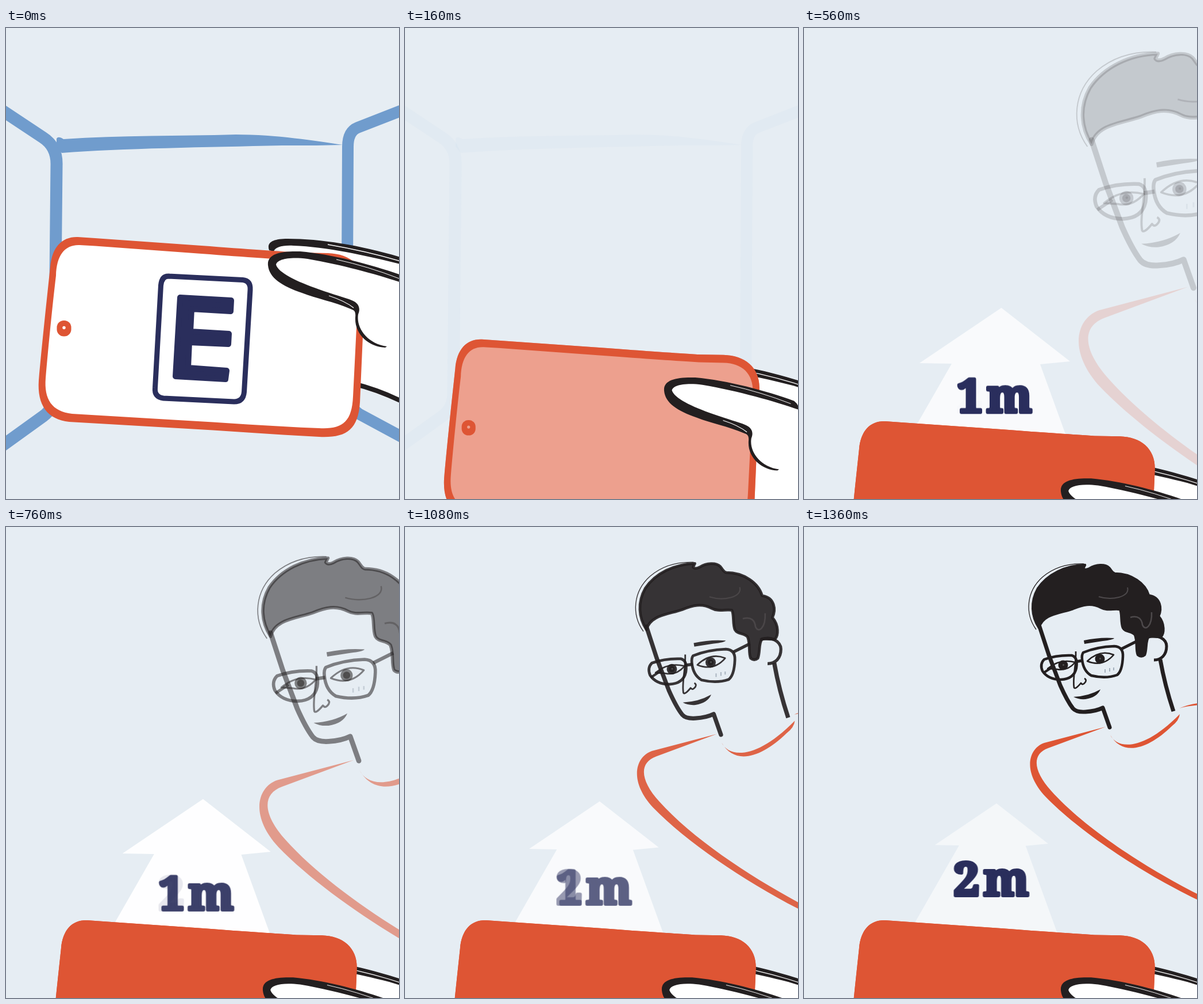
Write an HTML page with a canvas that moves like this. It is 684 px wide and 818 px high and loops after 1.4 s.

```html
<!DOCTYPE html>
<html lang="en">
<head>
<meta charset="utf-8">
<title>Arm's length</title>
<style>
html, body { margin: 0; width: 684px; height: 818px; overflow: hidden; background: #e6edf3; }
canvas { display: block; }
</style>
</head>
<body>
<canvas id="stage" width="684" height="818"></canvas>
<script>
const ctx = document.getElementById('stage').getContext('2d');
const LOOP = 1400, STEP = 40;
const SKY = '#e6edf3', BLUE = '#709ccd', ORANGE = '#de5534', NAVY = '#2a2e5c', INK = '#231f20', WHITE = '#fff';

const progress = (t, start, length) => Math.min(1, Math.max(0, (t - start) / length));
const easeOut = x => 1 - (1 - x) ** 2;
const mix = (a, b, x) => a + (b - a) * x;

const cache = new Map();
function path(d) {
  if (!cache.has(d)) cache.set(d, new Path2D(d));
  return cache.get(d);
}
function fill(d, color) {
  ctx.fillStyle = color;
  ctx.fill(path(d));
}
function line(d, color, width, cap = 'butt') {
  ctx.strokeStyle = color;
  ctx.lineWidth = width;
  ctx.lineCap = cap;
  ctx.lineJoin = 'round';
  ctx.stroke(path(d));
}
function dot(x, y, r, color) {
  ctx.fillStyle = color;
  ctx.beginPath();
  ctx.arc(x, y, r, 0, Math.PI * 2);
  ctx.fill();
}
function layer(alpha, draw) {
  if (alpha <= 0) return;
  ctx.save();
  ctx.globalAlpha = alpha;
  draw();
  ctx.restore();
}
function place(x, y, scale, draw) {
  ctx.save();
  ctx.translate(x, y);
  ctx.scale(scale, scale);
  draw();
  ctx.restore();
}

// Labels are rendered once so they can cross-fade as a single layer.
function makeLabel(text) {
  const c = document.createElement('canvas');
  c.width = 220;
  c.height = 110;
  const g = c.getContext('2d');
  g.font = '900 80px "Noto Serif", serif';
  g.letterSpacing = '7px';
  g.textAlign = 'center';
  g.lineJoin = 'round';
  g.lineWidth = 6;
  g.fillStyle = g.strokeStyle = NAVY;
  g.fillText(text, 113, 88);
  g.strokeText(text, 113, 88);
  return c;
}
const labels = [makeLabel('1m'), makeLabel('2m')];

function drawRoom() {
  line('M-10 141 L64 190 Q89 206 88 238 L84 635 Q84 660 65 674 L-10 728', BLUE, 21);
  line('M694 141 L612 173 Q595 180 595 206 L593 630 Q594 656 614 670 L694 713', BLUE, 20);
  fill('M88 192 Q91 187 100 193 C200 186 300 188 400 185 C470 185 540 196 586 203 L540 204 L480 204 C350 207 200 209 97 217 L88 206Z', BLUE);
}

function drawMan() {
  const hair = 'M409 175 C396 155 394 130 407 107 C424 82 455 67 489 66 L486 72 Q489 76 497 72 C508 65 524 64 531 71 C536 77 536 80 541 81 C570 81 594 98 600 119 C621 122 623 142 617 155 C628 168 627 185 621 191 L600 190 C594 197 597 212 593 222 Q587 227 581 222 C577 212 581 200 576 187 C570 180 559 183 555 175 C551 165 554 150 550 143 C540 141 528 146 517 140 C500 131 485 135 468 142 C445 150 415 151 409 175Z';
  fill(hair, INK);
  line(hair, INK, 4.5);
  line('M404 178 C384 150 387 112 415 87 C435 70 460 63 487 64', INK, 1.3);
  line('M513 121 C535 128 568 122 563 105', '#4d494b', 2);
  line('M568 157 C582 153 588 160 589 170 C594 182 606 172 605 148', '#4d494b', 2.5);
  line('M409 170 L426 222 L446 275 Q458 302 468 315 Q474 322 490 321 Q508 320 520 314 L532 348', INK, 7, 'round');
  line('M597 192 C615 184 631 195 631 207 C631 222 622 231 609 231', INK, 5);
  line('M620 230 Q628 275 643 320', INK, 7);
  line('M552 212 L580 198', INK, 5);
  fill('M487 197 Q515 191 540 193 Q538 196 520 198 L488 203Z', INK);
  line('M418 230 Q440 222 466 223 Q477 226 474 245 Q470 264 447 265 Q425 265 415 250 Q410 238 418 230Z', INK, 4.5);
  line('M486 218 Q510 208 540 207 Q556 208 555 225 Q554 250 545 257 Q525 264 500 258 Q486 250 484 230 Q483 222 486 218Z', INK, 4.5);
  line('M472 234 L485 232', INK, 5);
  line('M416 254 L434 242', INK, 4);
  line('M424 246 Q445 228 472 235 Q458 251 440 247Z', INK, 2.5);
  line('M493 233 Q515 212 539 222 Q520 244 493 233Z', INK, 2.5);
  for (const [x, y] of [[451, 240], [515, 229]]) {
    dot(x, y, 8.5, INK);
    dot(x, y, 5, INK);
    dot(x + .5, y - .5, 1.5, '#555');
  }
  line('M473 216 C474 240 467 262 470 279 Q472 283 482 271 Q485 276 490 269 Q492 265 488 263', INK, 2.7);
  fill('M469 295 Q495 294 516 282 Q510 296 490 299 Q478 300 469 295Z', INK);
  line('M524 247 v6 M532 245 v6 M539 244 v5', '#a6b1bd', 2);
  fill('M525 347 L425 384 C395 395 400 425 430 458 C490 525 600 595 690 640 L690 650 C590 602 480 530 420 468 C380 425 390 385 418 375Z', ORANGE);
  fill('M533 361 C545 386 590 390 654 325 Q653 336 640 346 C600 385 555 400 533 361Z', ORANGE);
  fill('M653 315 Q670 307 694 305 L694 309 Q670 310 653 315Z', ORANGE);
}

function drawArrow() {
  fill('M0 0 L119.5 93 L67.5 98 L187.5 428 L-276.5 428 L-86.5 97 L-142.5 96Z', WHITE);
}

function drawPhone(p, cardAlpha) {
  const body = 'M125 363 L155 365 L340 378 Q460 387 513 390 L560 391 C600 392 627 415 624.5 455 L616 650 C613 700 590 712 545 710 C460 706 380 699 300 695 L110 684 C72 680 54 655 57 612 C62 555 70 480 77 415 C80 380 98 362 125 363Z';
  const screen = 'M128 377 L155 378.5 L340 392 Q460 401 515 404 L560 405 C595 406 614 425 613 460 L604 640 C602 685 585 697 545 695 C460 692 380 685 300 681 L115 670 C80 666 66 645 69 608 C74 550 81 480 87 430 C88 395 102 376 128 377Z';
  fill(body, ORANGE);
  fill(screen, WHITE);
  layer(cardAlpha, () => {
    line('M283 431 L412 437.5 Q426 439 425 455 L414.5 632 Q413 649 397 649 L274 643 Q258 641 259.5 625 L269.5 447 Q271 430 284 431Z', NAVY, 9);
    const letter = 'M303 468 L392 473 L391 492 L323 488 L321 527 L388 531 L387 549 L319 546 L317 590 L384 595 L382 610 L295 605Z';
    fill(letter, NAVY);
    line(letter, NAVY, 10);
  });
  ctx.fillStyle = ORANGE;
  ctx.beginPath();
  ctx.roundRect(88.5, 508, 25, 27.5, 12);
  ctx.fill();
  dot(101, 520.5, 2.7, WHITE);
  layer(p, () => fill(body, ORANGE));
}

function drawFinger() {
  fill('M462 382 C466 370 490 372 510 372 C570 374 630 386 690 405 L760 425 L760 680 L690 652 L600 618 L600 420Z', WHITE);
  fill('M458 386 C453 372 465 366 490 366 C550 366 620 378 690 399 L760 421 L760 433 L690 411 C630 396 560 380 500 378 C480 377 468 381 466 388Z', INK);
  line('M560 376 Q630 388 690 406 L740 422', WHITE, 1.3);
  line('M606 618 Q650 629 694 651', INK, 8);
}

function drawThumb() {
  fill('M463 408 C466 394 490 392 515 394 C580 402 640 418 690 436 L760 450 L760 600 L690 560 L656 554 C622 546 608 520 611 495 C610 484 603 480 596 478 C545 464 470 440 463 408Z', WHITE);
  fill('M456 412 C454 392 478 387 512 388 C570 393 640 412 690 430 Q698 436 699 446 C660 432 590 412 525 401 C492 397 472 402 470 411 C474 425 505 440 545 454 C570 463 590 468 602 473 C615 478 617 488 613 497 C609 520 628 548 663 553 L660 555 C632 554 606 532 608 502 C609 492 606 490 600 488 C570 475 540 470 515 460 C480 448 458 434 456 412Z', INK);
  line('M575 402 Q630 414 684 435', WHITE, 1);
  line('M562 465 Q590 474 605 486', WHITE, 1.2);
}

function render(t) {
  const drop = easeOut(progress(t, 0, 480));
  const roomAlpha = (1 - progress(t, 0, 200)) ** 2;
  const cardAlpha = (1 - progress(t, 0, 160)) ** 2;
  const zoomTime = progress(t, 480, 880);
  const entry = easeOut(zoomTime);
  const swap = zoomTime ** 2;
  const rise = easeOut(progress(t, 400, 320));
  const recede = progress(t, 720, 640);
  const size = 1 - .06 * drop;

  ctx.fillStyle = SKY;
  ctx.fillRect(0, 0, 684, 818);
  layer(roomAlpha, drawRoom);

  const zoom = mix(1.535, 1, entry);
  layer(entry, () => place(202 * (1 - zoom), 114.5 * (1 - zoom), zoom, drawMan));

  layer(rise * mix(1, .56, recede), () =>
    place(mix(343.5, 335, recede), mix(472, 480, recede) + 56 * (1 - rise), mix(1, .752, recede), drawArrow));
  const labelAlpha = progress(t, 400, 120);
  [1 - swap, swap].forEach((alpha, i) => layer(alpha * labelAlpha, () =>
    ctx.drawImage(labels[i], mix(332, 326.5, swap) - 110, mix(667.5, 640, swap) - 88)));

  place(18.4 * drop, 403.6 * drop, size, drawFinger);
  place(23.5 * drop, 341.8 * drop, size, () => drawPhone(drop, cardAlpha));
  place(18.4 * drop, 417.6 * drop, size, drawThumb);
}

const begin = performance.now();
function tick() {
  const t = (performance.now() - begin) % LOOP;
  render(Math.floor(t / STEP) * STEP);
  requestAnimationFrame(tick);
}
tick();
</script>
</body>
</html>
```
